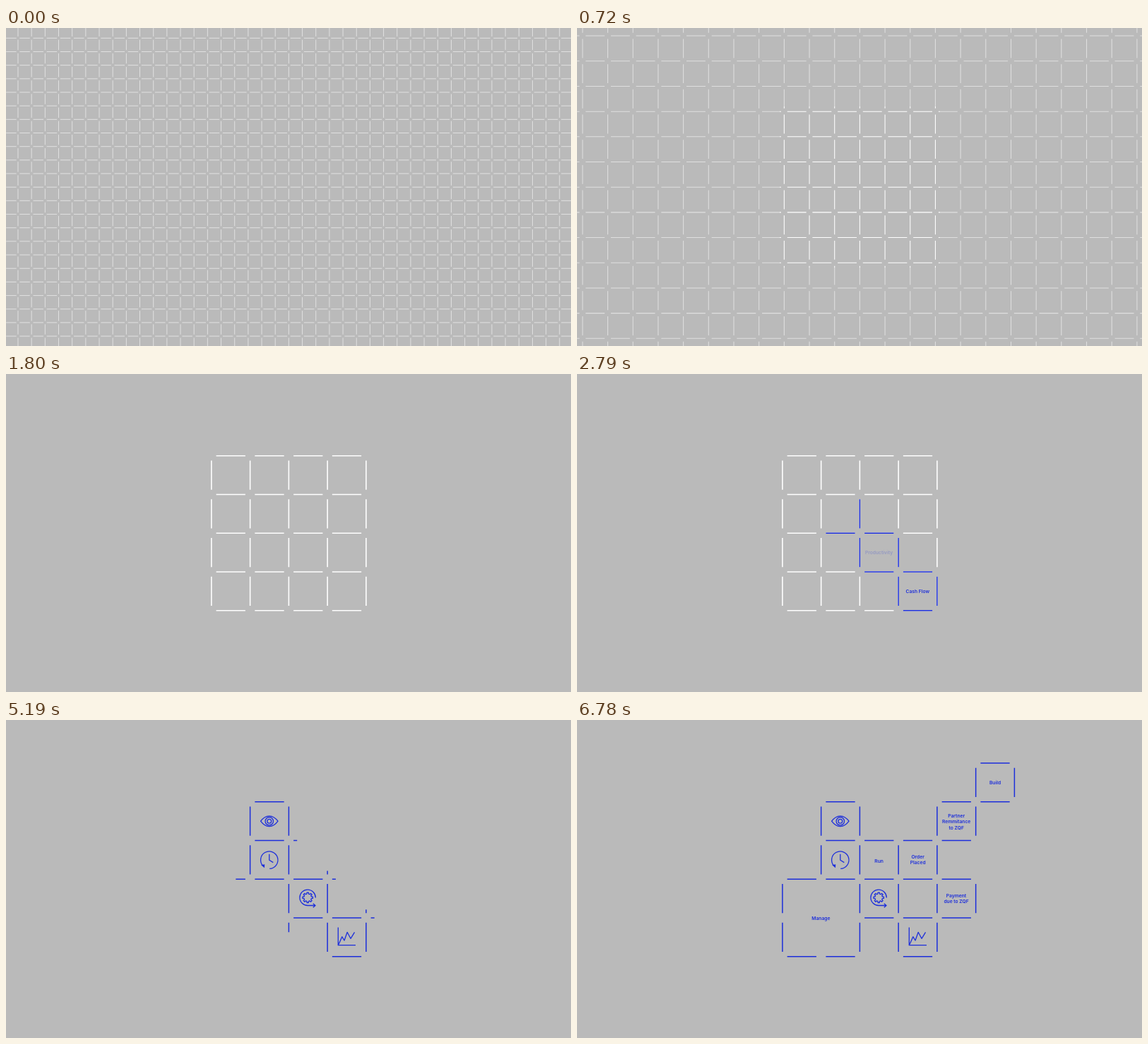
An HTML page for the animation above (6.81 s loop, 800 by 450 pixels).

```html
<!DOCTYPE html>
<html lang="en">
<head>
<meta charset="utf-8">
<title>Grid build</title>
<style>
  html, body { margin: 0; width: 100%; height: 100%; overflow: hidden; background: #bababa; }
  svg { display: block; width: 100vw; height: 100vh; }
  text { font: 600 6.7px Inter, "Noto Sans", sans-serif; text-anchor: middle; fill: #1c2edb; }
  .line { fill: none; stroke: #1c2edb; stroke-width: 1.5; }
  .icon { fill: none; stroke: #1c2edb; stroke-width: 1.3; stroke-linejoin: round; }
  .icon .solid { fill: #1c2edb; stroke: none; }
  .white { fill: none; stroke: #fff; }
</style>
</head>
<body>
<svg id="stage" viewBox="0 0 800 450">
  <defs>
    <clipPath id="inside"><path d="M287 111H514V339H287Z"/></clipPath>
    <clipPath id="outside"><path clip-rule="evenodd" d="M0 0H800V450H0ZM287 111H514V339H287Z"/></clipPath>
  </defs>
  <rect width="800" height="450" fill="#bababa"/>
  <g clip-path="url(#outside)"><path id="outer" class="white"/></g>
  <g clip-path="url(#inside)"><path id="inner" class="white"/></g>
  <path id="blue" class="line"/>
  <g id="labels"></g>
  <g id="icons" class="icon">
    <path d="M360.6 143.2Q366 135.8 372.8 135.8T385 143.2Q379.600 150.600 372.8 150.600T360.6 143.2Z"/>
    <circle cx="372.8" cy="143.2" r="5.7"/>
    <circle cx="372.8" cy="143.2" r="2.9"/>
    <path d="M373.200 210.300A12.200 12.200 0 1 0 364 206.600M372.800 189.800V198.200L378.300 201.600"/>
    <path class="solid" d="M361.200 205.200L366.200 204.200L366 209.200Z"/>
    <path d="M438.300 251.400A11.200 11.200 0 1 0 427.200 262.500H437.800M434.800 259.700L438 262.500L434.800 265.300"/>
    <path id="gear"/>
    <path d="M470.300 293.500V318.700H495M471 317.500L475.800 306.700L479 312L483.200 300.300L488 309.300L493.500 300.300"/>
  </g>
</svg>
<script>
const LOOP = 6810, STEP = 30;
const CX = 400.4, CY = 225.2, CELL = 54.75, SMALL = 19.17, GAP = 0.123;
const $ = id => document.getElementById(id);

const clamp = v => Math.min(1, Math.max(0, v));
const span = (t, start, length) => clamp((t - start) / length);
const smooth = x => x * x * (3 - 2 * x);

function bezier(x, x1, x2) {
  let lo = 0, hi = 1;
  for (let i = 0; i < 24; i++) {
    const s = (lo + hi) / 2, r = 1 - s;
    if (3 * x1 * s * r * r + 3 * x2 * s * s * r + s ** 3 < x) lo = s; else hi = s;
  }
  return smooth(lo);
}

// Dashed lattice centred on the stage, cut off beyond nx, ny cells
function lattice(size, nx, ny) {
  const len = size * (1 - 2 * GAP);
  let d = "";
  for (let i = -nx; i <= nx; i++) {
    for (let j = -ny; j <= ny; j++) {
      const x = CX + i * size, y = CY + j * size, pad = size * GAP;
      if (i < nx) d += `M${(x + pad).toFixed(2)} ${y.toFixed(2)}h${len.toFixed(2)}`;
      if (j < ny) d += `M${x.toFixed(2)} ${(y + pad).toFixed(2)}v${len.toFixed(2)}`;
    }
  }
  return d;
}

// Each wave sweeps its cells diagonally; cells are [column, row, size]
const waves = [
  { start: 2050, length: 1130, reach: 387, dist: (x, y) => 4 - x - y,
    cells: [[1, 1, 1], [0, 0, 1], [-1, -1, 1], [-1, -2, 1]] },
  { start: 5013, length: 811, reach: 166, dist: (x, y) => y - x - 1,
    cells: [[-2, 0, 2]] },
  { start: 5098, length: 811, reach: 330, dist: (x, y) => x - y - 1,
    cells: [[0, -1, 1], [1, -1, 1], [1, 0, 1], [2, 0, 1], [2, -2, 1], [3, -3, 1]] }
];

const taken = new Set();
for (const wave of waves) {
  wave.edges = [];
  const add = (x, y, dx, dy) => {
    const key = [x, y, dx].join();
    if (taken.has(key)) return;
    taken.add(key);
    let a = [x + dx * GAP, y + dy * GAP];
    let b = [x + dx * (1 - GAP), y + dy * (1 - GAP)];
    if (wave.dist(...a) > wave.dist(...b)) [a, b] = [b, a];
    wave.edges.push({ a, b, from: wave.dist(...a) * CELL, to: wave.dist(...b) * CELL });
  };
  for (const [x, y, n] of wave.cells) {
    for (let k = 0; k < n; k++) {
      add(x + k, y, 1, 0);
      add(x + k, y + n, 1, 0);
      add(x, y + k, 0, 1);
      add(x + n, y + k, 0, 1);
    }
  }
}

function waveLines(wave, t) {
  const front = wave.reach * smooth(span(t, wave.start, wave.length));
  const px = x => (CX + x * CELL).toFixed(2), py = y => (CY + y * CELL).toFixed(2);
  let d = "";
  for (const { a, b, from, to } of wave.edges) {
    const p = clamp((front - from) / (to - from));
    if (p > 0) {
      d += `M${px(a[0])} ${py(a[1])}L${px(a[0] + (b[0] - a[0]) * p)} ${py(a[1] + (b[1] - a[1]) * p)}`;
    }
  }
  return d;
}

// Text, centre x, first baseline, time in, time out
const labels = [
  ["Cash Flow", 482.3, 309.7, 2450, 4110],
  ["Productivity", 427.6, 254.8, 2720, 4110],
  ["Efficiency", 372.6, 201.1, 3000, 4110],
  ["Visibility", 372.2, 147, 3250, 4110],
  ["Manage", 345.4, 282.8, 5750],
  ["Run", 427.6, 202.2, 5850],
  ["Order|Placed", 482.6, 195.9, 6000],
  ["Payment|due to ZQF", 537, 250.9, 6150],
  ["Partner|Remmitance|to ZQF", 537.2, 137.5, 6200],
  ["Build", 592, 91, 6380]
].map(([words, x, y, start, end = Infinity]) => {
  const node = document.createElementNS("http://www.w3.org/2000/svg", "text");
  words.split("|").forEach((line, i) => {
    const row = document.createElementNS("http://www.w3.org/2000/svg", "tspan");
    row.setAttribute("x", x);
    row.setAttribute("y", y + i * 8.5);
    row.textContent = line;
    node.append(row);
  });
  $("labels").append(node);
  return { node, start, end };
});

function gearPath(cx, cy, teeth) {
  const points = [];
  for (let i = 0; i < teeth; i++) {
    for (const [shift, r] of [[-0.3, 5.4], [-0.2, 7.3], [0.2, 7.3], [0.3, 5.4]]) {
      const a = (i + shift) / teeth * 2 * Math.PI;
      points.push(`${(cx + r * Math.cos(a)).toFixed(2)} ${(cy + r * Math.sin(a)).toFixed(2)}`);
    }
  }
  return `M${points.join("L")}Z`;
}
$("gear").setAttribute("d", gearPath(427.2, 251.3, 8));

let drawnSize = 0;
function drawGrid(t) {
  const zoom = bezier(span(t, 240, 1350), 0.281, 0.386);
  const size = SMALL + (CELL - SMALL) * zoom;
  if (size !== drawnSize) {
    drawnSize = size;
    const d = lattice(size, Math.ceil(CX / size) + 1, Math.ceil(CY / size) + 1);
    for (const id of ["outer", "inner"]) {
      $(id).setAttribute("d", d);
      $(id).setAttribute("stroke-width", 1.6 * size / CELL);
    }
  }
  $("outer").setAttribute("opacity", 1 - zoom);
  $("inner").setAttribute("opacity", 1 - span(t, 3740, 340));
}

function render(t) {
  drawGrid(t);
  $("blue").setAttribute("d", waves.map(w => waveLines(w, t)).join(""));
  for (const { node, start, end } of labels) {
    node.setAttribute("opacity", span(t, start, 300) * (1 - span(t, end, 300)));
  }
  $("icons").setAttribute("opacity", span(t, 4380, 390));
}

const begin = performance.now();
function tick() {
  const t = (performance.now() - begin) % LOOP;
  render(t - t % STEP);
  requestAnimationFrame(tick);
}
tick();
</script>
</body>
</html>
```
